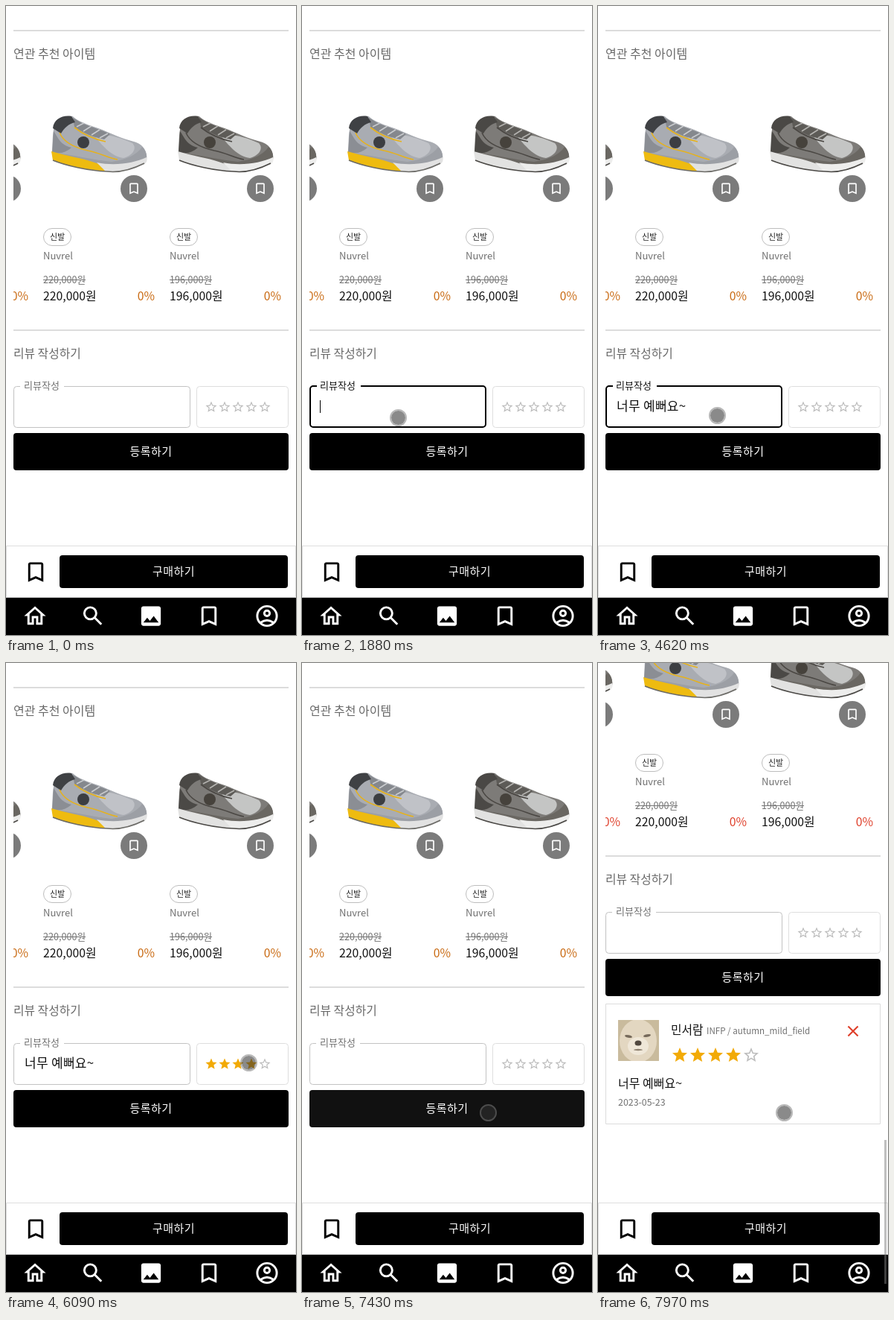
Recreate the animation shown at these times as an HTML page with a canvas. Size 390x844 px, loop 8000 ms.

```html
<!DOCTYPE html>
<html lang="ko">
<head>
<meta charset="utf-8">
<title>리뷰 작성하기</title>
<style>
html, body { margin: 0; width: 100%; height: 100%; overflow: hidden; background: #fff; }
canvas { display: block; width: 390px; height: 844px; }
</style>
</head>
<body>
<canvas id="stage"></canvas>
<script>
const W = 390, H = 844, LOOP = 8000;
const FONT = '"Noto Sans CJK KR", "Noto Sans CJK", "Noto Sans CJK JP", sans-serif';
const canvas = document.getElementById('stage');
const ctx = canvas.getContext('2d');
const dpr = window.devicePixelRatio || 1;
canvas.width = W * dpr;
canvas.height = H * dpr;

const BOOKMARK = new Path2D('M17 3H7c-1.1 0-2 .9-2 2v16l7-3 7 3V5c0-1.1-.9-2-2-2zm0 15-5-2.18L7 18V5h10z');
const HOME = new Path2D('m12 5.69 5 4.5V18h-2v-6H9v6H7v-7.81l5-4.5M12 3 2 12h3v8h6v-6h2v6h6v-8h3z');
const PICTURE = new Path2D('M21 19V5c0-1.1-.9-2-2-2H5c-1.1 0-2 .9-2 2v14c0 1.1.9 2 2 2h14c1.1 0 2-.9 2-2zM8.5 13.5l2.5 3.01L14.5 12l4.5 6H5z');
const STAR = new Path2D('M12 17.27 18.18 21l-1.64-7.03L22 9.24l-7.19-.61L12 2 9.19 8.63 2 9.24l5.46 4.73L5.82 21z');
const STAR_HOLE = new Path2D('M12 15.4l-3.76 2.27 1-4.28-3.32-2.88 4.38-.38L12 6.1l1.71 4.04 4.38.38-3.32 2.88 1 4.28z');
const STAR_LINE = new Path2D(STAR);
STAR_LINE.addPath(STAR_HOLE);

const SHOE = {
  upper: new Path2D('M12 196C13 186 12 178 14 166C14 156 20 150 27 149C34 150 38 145 42 150C50 156 62 160 74 164C92 171 106 178 122 182C136 186 140 196 139 206C124 214 106 216 92 217C62 212 32 206 12 196Z'),
  mesh: new Path2D('M68 173C86 171 104 177 120 184C126 190 122 200 108 204C92 202 80 188 68 173Z'),
  guard: new Path2D('M12 196C40 200 70 207 92 209C112 206 126 200 133 189C139 194 140 202 139 206C124 214 106 216 92 217C62 212 32 206 12 196Z'),
  counter: new Path2D('M14 168C20 176 22 186 38 190C30 197 22 199 12 196Z'),
  tongue: new Path2D('M40 150L50 156C62 162 78 166 90 172L82 179C68 176 52 170 42 162Z'),
  collar: new Path2D('M13 164C14 152 26 146 38 148L43 156C34 158 28 164 24 171Z'),
  heel: new Path2D('M11 195C30 201 52 204 66 209C78 213 86 215 96 215L90 222C62 221 28 214 13 207Z'),
  sole: new Path2D('M72 210C96 215 122 211 139 203C141 208 138 213 130 215C114 223 94 224 84 222Z'),
  trim: new Path2D('M22 170C27 182 42 190 60 194C76 197 88 204 100 206M42 163C56 174 70 179 84 182'),
  laces: new Path2D('M45 162L55 157M54 168L65 161M65 173L76 166M76 177L87 171'),
  edge: new Path2D('M13 207C30 214 60 221 86 222C102 224 118 220 136 211')
};
const FILLS = ['upper', 'mesh', 'guard', 'counter', 'tongue', 'collar', 'heel', 'sole'];
const LINES = [['trim', 1.6], ['laces', 1.6], ['edge', 1.6]];
const GREY_SHOE = { upper: '#a9acb2', mesh: '#c0c2c7', guard: '#9c9fa5', counter: '#8b8e94', tongue: '#85888d', collar: '#3f4144', heel: '#eebb10', sole: '#e2e2e2', trim: '#e6b21c', laces: '#c9cbce', edge: '#6b6a66', badge: '#3c3e42' };
const DARK_SHOE = { upper: '#7d7b78', mesh: '#c4c5c4', guard: '#6a6762', counter: '#4b4946', tongue: '#5d5b57', collar: '#4a4845', heel: '#e2e2e1', sole: '#ededec', trim: '#4a4743', laces: '#b4b3b0', edge: '#4a4845', badge: '#46423c' };

// time, text in the field
const TYPED = [[0, ''], [2140, 'ㄴ'], [2340, '너'], [2430, '넘'], [2610, '너무'], [2750, '너무 '],
  [2880, '너무 ㅇ'], [2950, '너무 예'], [3080, '너무 예ㅃ'], [3210, '너무 예뻐'], [3350, '너무 예뻥'],
  [3550, '너무 예뻐요'], [3880, '너무 예뻐요~'], [7430, '']];
const SCROLL = [[0, 0], [7700, 30], [7830, 114], [7900, 150], [7970, 176]];
const ACCENT = [[0, '#c96a12'], [7700, '#c85f24'], [7970, '#df3f2a']];
const CARET = [[0, false], [1800, true], [2140, false], [4010, true], [4480, false], [4990, true], [5480, false]];
// start, end, steps, x, y, easing power (negative eases out)
const MOVES = [[460, 950, 8, 139.5, 560.5, -1.5], [1280, 1360, 2, 129.5, 552.5, 1],
  [4410, 4620, 4, 160.5, 549.5, 1.5], [4690, 5210, 8, 320.5, 522.5, -1.5],
  [5280, 5480, 3, 326.5, 536.5, -1.5], [6290, 6690, 7, 250.5, 603.5, -1.3]];
const PRESSES = [[1550, 1740], [5620, 5830], [6890, 7090]];

const within = (t, a, b) => t >= a && t < b;
const clamp = v => Math.max(0, Math.min(1, v));

function valueAt(list, t) {
  let value;
  for (const [time, v] of list) if (t >= time) value = v;
  return value;
}

function pointerAt(t) {
  let x = 288.5, y = 753.5;
  for (const [a, b, n, toX, toY, power] of MOVES) {
    if (t < a) break;
    const k = Math.min(n - 1, Math.floor((t - a) / (b - a) * (n - 1) + 0.02));
    const p = (k + 1) / n;
    const e = power > 0 ? p ** power : 1 - (1 - p) ** -power;
    x += (toX - x) * e;
    y += (toY - y) * e;
  }
  return [x, y];
}

function text(s, x, y, size, color, align = 'left', spacing = 0, weight = 350) {
  ctx.font = `${weight} ${size}px ${FONT}`;
  ctx.letterSpacing = spacing + 'px';
  ctx.textAlign = align;
  ctx.fillStyle = color;
  ctx.fillText(s, x, y);
  return ctx.measureText(s).width;
}

function buttonText(s, x, y) {
  text(s, x, y, 15, '#fff', 'center', 0.4, 400);
}

function rect(x, y, w, h, color) {
  ctx.fillStyle = color;
  ctx.fillRect(x, y, w, h);
}

function roundBox(x, y, w, h, r) {
  ctx.beginPath();
  ctx.roundRect(x, y, w, h, r);
}

function fillBox(x, y, w, h, r, color) {
  roundBox(x, y, w, h, r);
  ctx.fillStyle = color;
  ctx.fill();
}

function frameBox(x, y, w, h, r, color, line = 1) {
  roundBox(x + line / 2, y + line / 2, w - line, h - line, r);
  ctx.strokeStyle = color;
  ctx.lineWidth = line;
  ctx.stroke();
}

function disc(x, y, r, color) {
  ellipse(x, y, r, r, color);
}

function ellipse(x, y, rx, ry, color, turn = 0) {
  ctx.beginPath();
  ctx.ellipse(x, y, rx, ry, turn, 0, Math.PI * 2);
  ctx.fillStyle = color;
  ctx.fill();
}

// Runs draw in a 24-unit icon space centred on (x, y).
function iconSpace(x, y, size, draw) {
  ctx.save();
  ctx.translate(x - size / 2, y - size / 2);
  ctx.scale(size / 24, size / 24);
  draw();
  ctx.restore();
}

function icon(path, x, y, size, color) {
  iconSpace(x, y, size, () => {
    ctx.fillStyle = color;
    ctx.fill(path, 'evenodd');
  });
}

function lineIcon(d, x, y, size, color) {
  iconSpace(x, y, size, () => {
    ctx.strokeStyle = color;
    ctx.lineWidth = 2;
    ctx.stroke(new Path2D(d));
  });
}

function stars(x, y, size, count) {
  for (let i = 0; i < 5; i++) {
    const full = i < count;
    icon(full ? STAR : STAR_LINE, x + i * size, y, size, full ? '#f2aa06' : '#bcbcbc');
  }
}

function shoe(x, colors) {
  ctx.save();
  ctx.translate(x, 0);
  for (const part of FILLS) {
    ctx.fillStyle = colors[part];
    ctx.fill(SHOE[part]);
  }
  for (const [part, width] of LINES) {
    ctx.strokeStyle = colors[part];
    ctx.lineWidth = width;
    ctx.stroke(SHOE[part]);
  }
  disc(54, 183, 8, colors.badge);
  ctx.restore();
}

function product(x, colors, price, accent) {
  shoe(x, colors);
  disc(x + 122, 245, 18, '#7b7b7b');
  icon(BOOKMARK, x + 122, 245, 20, '#fff');
  frameBox(x, 298, 38, 24, 12, '#bdbdbd');
  text('신발', x + 19, 313.5, 11, '#222', 'center');
  text('Nuvrel', x, 340, 13, '#707070');
  const w = text(price, x, 371.5, 12.6, '#707070');
  rect(x, 367, w, 1, '#777');
  text(price, x, 395, 15.8, '#111');
  text('0%', x + 150, 395, 15.8, accent, 'right');
}

function reviewField(t) {
  const focus = within(t, 1740, 5830);
  if (focus) frameBox(10, 509, 238, 57, 4, '#000', 2);
  else frameBox(10, 510, 238, 56, 4, '#c2c2c2');
  rect(focus ? 20 : 19, 508, 59, 5, '#fff');
  text('리뷰작성', 24, 514, 13, focus ? '#111' : '#707070');
  const typed = valueAt(TYPED, t);
  const w = text(typed, 25, 543, 17, '#111', 'left', 0.3);
  if (valueAt(CARET, t)) rect(Math.round(24 + (typed ? w : 0)), 529, 1, 17, '#000');
  frameBox(256, 510, 124, 56, 4, '#dedede');
  stars(276, 538, 18, within(t, 5830, 7430) ? 4 : 0);
}

function submitButton(t) {
  fillBox(10, 573, 370, 50, 4, '#000');
  buttonText('등록하기', 195, 603);
  if (!within(t, 7085, 7500)) return;
  const p = clamp((t - 7010) / 550);
  const grow = Math.min(1, p * p * (3 - 2 * p) * 1.5);
  const fade = 1 - clamp((t - 7220) / 270);
  ctx.save();
  roundBox(10, 573, 370, 50, 4);
  ctx.clip();
  disc(250, 603, 242 * grow, `rgba(255,255,255,${(0.1 + 0.2 * grow) * fade})`);
  ctx.restore();
}

function dogPhoto(x, y) {
  ctx.save();
  ctx.beginPath();
  ctx.rect(x, y, 55, 55);
  ctx.clip();
  ctx.translate(x, y);
  rect(0, 0, 55, 55, '#c9bb9d');
  ellipse(27, 28, 25, 29, '#e3d7c1');
  ellipse(27, 35, 14, 12, '#efe7d8');
  ellipse(14, 22, 5, 1.8, '#75695a', 0.2);
  ellipse(39, 21, 5, 1.8, '#75695a', -0.2);
  ellipse(27, 31, 4.5, 3.5, '#51483f');
  ellipse(27, 40, 6, 1.2, '#8f8271');
  ctx.restore();
}

function reviewCard(accent) {
  frameBox(10, 633, 370, 162, 0, '#dcdcdc');
  dogPhoto(27, 655);
  text('민서람', 98, 674, 15.8, '#111');
  text('INFP / autumn_mild_field', 146, 673.5, 11.6, '#707070');
  lineIcon('M5.7 5.7L18.3 18.3M18.3 5.7L5.7 18.3', 343, 670, 25, accent);
  stars(110, 702, 24, 4);
  text('너무 예뻐요~', 27, 746, 16, '#111');
  text('2023-05-23', 27, 769.5, 12.4, '#707070');
}

function bottomBars() {
  rect(0, 724, W, 70, '#fff');
  frameBox(0, 724, W, 70, 0, '#dedede');
  icon(BOOKMARK, 40, 759.5, 35, '#000');
  fillBox(72, 737, 307, 44, 4, '#000');
  buttonText('구매하기', 225.5, 764);
  rect(0, 794, W, 50, '#000');
  const y = 818.5, size = 35, white = '#fff';
  icon(HOME, 39, y, size, white);
  lineIcon('M15 9.5A5.5 5.5 0 1 1 4 9.5A5.5 5.5 0 1 1 15 9.5M13.6 13.6L19.7 19.7', 117, y, size, white);
  icon(PICTURE, 195, y, size, white);
  icon(BOOKMARK, 273, y, size, white);
  lineIcon('M21 12A9 9 0 1 1 3 12A9 9 0 1 1 21 12M14.5 9.5A2.5 2.5 0 1 1 9.5 9.5A2.5 2.5 0 1 1 14.5 9.5M6 18.2Q12 13.8 18 18.2', 351, y, size, white);
}

function pointer(t) {
  if (t < 390) return;
  const [x, y] = pointerAt(t);
  const pressed = PRESSES.some(([a, b]) => within(t, a, b));
  disc(x, y, 9.5, `rgba(49,49,49,${pressed ? 0.65 : 0.57})`);
  ctx.beginPath();
  ctx.arc(x, y, 10.5, 0, Math.PI * 2);
  ctx.strokeStyle = 'rgba(125,125,125,.55)';
  ctx.lineWidth = 2;
  ctx.stroke();
}

function draw(t) {
  const scroll = valueAt(SCROLL, t), accent = valueAt(ACCENT, t);
  ctx.setTransform(dpr, 0, 0, dpr, 0, 0);
  rect(0, 0, W, H, '#fff');
  ctx.save();
  ctx.translate(0, -scroll);
  rect(10, 32, 370, 2, '#dcdcdc');
  text('연관 추천 아이템', 10, 70, 16, '#686868');
  ctx.save();
  ctx.beginPath();
  ctx.rect(10, 80, 370, 340);
  ctx.clip();
  product(-120, DARK_SHOE, '196,000원', accent);
  product(50, GREY_SHOE, '220,000원', accent);
  product(220, DARK_SHOE, '196,000원', accent);
  ctx.restore();
  rect(10, 434, 370, 2, '#dcdcdc');
  text('리뷰 작성하기', 10, 472, 15.8, '#686868');
  reviewField(t);
  submitButton(t);
  if (t >= 7500) reviewCard(accent);
  ctx.restore();
  bottomBars();
  if (t >= 7700) rect(385, Math.round(609 + scroll * 0.1774), 3, 193, 'rgba(128,128,128,.5)');
  pointer(t);
}

const start = performance.now();
function tick() {
  draw((performance.now() - start) % LOOP);
  requestAnimationFrame(tick);
}
tick();
</script>
</body>
</html>
```
